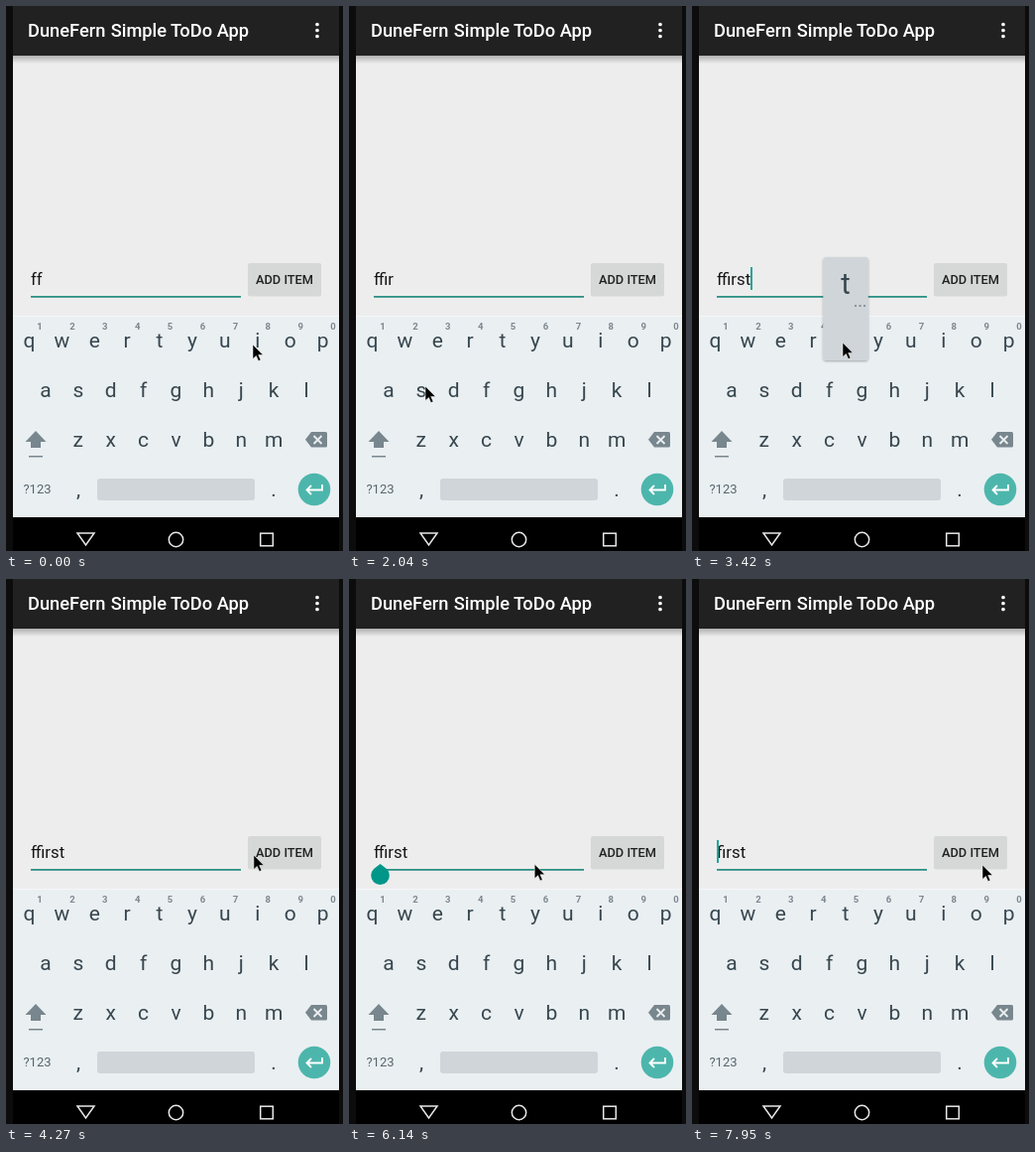
An HTML page that plays this animation: 340 px wide and 549 px high, repeating every 8 s.

```html
<!DOCTYPE html>
<html lang="en">
<head>
<meta charset="utf-8">
<style>
  html, body { margin: 0; width: 100%; height: 100%; overflow: hidden; background: #0c0c0c; }
  svg { display: block; width: 100%; height: 100%; font-family: Roboto, sans-serif; }
  .medium { font-weight: 500; }
  .key { font-size: 21px; fill: #37474f; text-anchor: middle; }
  .hint { font-size: 9.5px; font-weight: 700; fill: #7c878d; text-anchor: middle; }
  .nav { fill: none; stroke: #e8e8e8; stroke-width: 1.5; }
</style>
</head>
<body>
<svg viewBox="0 0 340 549">
  <defs>
    <linearGradient id="shade" x2="0" y2="1">
      <stop stop-color="#000" stop-opacity=".26"/>
      <stop offset="1" stop-color="#000" stop-opacity="0"/>
    </linearGradient>
    <filter id="shadow" x="-20%" y="-20%" width="140%" height="140%">
      <feDropShadow dx="0" dy="1" stdDeviation="1" flood-opacity=".3"/>
    </filter>
  </defs>

  <rect width="340" height="549" fill="#0c0c0c"/>
  <rect x="7" y="50" width="329" height="262" fill="#ededed"/>
  <rect x="7" y="50" width="329" height="8" fill="url(#shade)"/>
  <rect x="7" width="329" height="50" fill="#212121"/>
  <g class="medium" font-size="18.3" fill="#fff">
    <text x="22" y="31">DuneFern</text>
    <text x="245" y="31" text-anchor="end">Simple ToDo App</text>
  </g>
  <path d="M314 18.5V31" stroke="#fff" stroke-width="3.7" stroke-linecap="round" stroke-dasharray="0 6"/>

  <rect x="25" y="292" width="212" height="1.8" fill="#2f9186"/>
  <text id="entry" x="25" y="280.7" font-size="16.8" fill="#151515"></text>
  <rect id="caret" y="263" width="2" height="23" fill="#26a69a"/>
  <rect x="244" y="259" width="74" height="33.5" rx="2" fill="#d6d7d7"/>
  <text class="medium" x="281" y="280.3" font-size="12.8" fill="#212121" text-anchor="middle">ADD ITEM</text>

  <rect x="7" y="312" width="329" height="203" fill="#f5f7f8"/>
  <rect x="7" y="313" width="329" height="202" fill="#eaeff2"/>
  <g id="keys"></g>
  <g fill="#78868d">
    <path d="M30 428L40.5 439H35V445H25V439H19.5Z"/>
    <rect x="23" y="453" width="14" height="1.5"/>
    <path d="M308 429H322.5Q324 429 324 430.5V443Q324 444.5 322.5 444.5H308L302 436.8Z"/>
    <path d="M310.5 433L318.5 441M318.5 433L310.5 441" stroke="#eaeff2" stroke-width="1.8"/>
  </g>
  <text x="31.5" y="491" font-size="13" fill="#56656c" text-anchor="middle">?123</text>
  <rect x="92" y="476" width="159" height="22" rx="3" fill="#cfd5d8"/>
  <circle cx="311" cy="487" r="16.3" fill="#4db6ac"/>
  <path d="M319 482V487.5H304M308 483L303.5 487.5L308 492" fill="none" stroke="#fff" stroke-width="1.8"/>

  <rect x="7" y="515" width="329" height="34" fill="#000"/>
  <path class="nav" d="M72 531H89L80.5 543Z"/>
  <circle class="nav" cx="171.5" cy="537.5" r="7.2"/>
  <rect class="nav" x="256.7" y="531.2" width="12.6" height="12.6"/>

  <path id="handle" d="M31.5 287L38 292A9.3 9.3 0 1 1 25 292Z" fill="#009688"/>
  <g id="popup">
    <rect x="-22.7" y="-84" width="45.4" height="104" rx="3" fill="#cfd5d8" filter="url(#shadow)"/>
    <text id="popupLetter" y="-47" font-size="29" fill="#37474f" text-anchor="middle"></text>
    <path d="M9 -35H20" stroke="#87949a" stroke-width="2" stroke-dasharray="2 2.5"/>
  </g>
  <path id="pointer" d="M0 0V14.5L3.4 11.4L5.7 16.6L8 15.6L5.7 10.5H10.3Z" stroke="#fff" stroke-opacity=".75" stroke-width=".7"/>
</svg>
<script>
const $ = id => document.getElementById(id);
const LOOP = 8000, STEP = 132, BLINK = 500, PITCH = 32.9;

// Keyboard: rows are centred, 50px apart
const keyAt = {};
let keyMarkup = '';
const addKey = (letter, x, y) => {
  keyAt[letter] = [x, y];
  keyMarkup += `<text class="key" x="${x}" y="${y + 7}">${letter}</text>`;
};
['qwertyuiop', 'asdfghjkl', 'zxcvbnm'].forEach((row, r) => {
  [...row].forEach((letter, i) => addKey(letter, 171.5 + (i - (row.length - 1) / 2) * PITCH, 337 + 50 * r));
});
addKey(',', 73, 487);
addKey('.', 270, 487);
for (let i = 0; i < 10; i++)
  keyMarkup += `<text class="hint" x="${34 + i * PITCH}" y="326">${(i + 1) % 10}</text>`;
$('keys').innerHTML = keyMarkup;

// Each gesture starts at a pointer position, may edit the text, then glides on in a number of steps
const gestures = [
  { at: -BLINK, from: [249, 341], steps: 1, text: 'ff', caret: 2 },
  { at: 150, from: [249, 341], steps: 7, text: 'ffi', caret: 3, key: 'i' },
  { at: 1510, from: [120, 334], steps: 4, text: 'ffir', caret: 4, key: 'r' },
  { at: 2340, from: [77, 383], steps: 5, text: 'ffirs', caret: 5, key: 's' },
  { at: 3420, from: [152, 339], steps: 4, text: 'ffirst', caret: 6, key: 't' },
  { at: 4120, from: [259, 278], steps: 8 },
  { at: 5230, from: [48, 278], steps: 8, text: 'ffirst', caret: 1, handle: true },
  { at: 6280, from: [213, 289], steps: 4 },
  { at: 6810, from: [320, 487], steps: 1 },
  { at: 7530, from: [313, 441], steps: 3, text: 'first', caret: 0 },
  { at: LOOP, from: [293, 288] }
];

function pointerAt(t) {
  const i = gestures.findLastIndex(g => g.at <= t);
  const { at, from, steps } = gestures[i], to = gestures[i + 1].from;
  const u = Math.min(1, Math.floor((t - at) / STEP) / steps);
  const ease = u * u * (3 - 2 * u);
  return from.map((value, axis) => value + (to[axis] - value) * ease);
}

const show = (id, visible) => $(id).setAttribute('visibility', visible ? 'visible' : 'hidden');
const move = (id, [x, y]) => $(id).setAttribute('transform', `translate(${x} ${y})`);

const ruler = document.createElement('canvas').getContext('2d');
ruler.font = '16.8px Roboto, sans-serif';

function draw(t) {
  const edit = gestures.findLast(g => g.text && g.at <= t);
  const age = t - edit.at;
  $('entry').textContent = edit.text;
  const before = ruler.measureText(edit.text.slice(0, edit.caret)).width;
  $('caret').setAttribute('x', Math.round(24.7 + before));
  show('caret', age % (2 * BLINK) < BLINK);
  show('handle', edit.handle);

  const pressed = edit.key && age < STEP;
  show('popup', pressed);
  if (pressed) {
    $('popupLetter').textContent = edit.key;
    move('popup', keyAt[edit.key]);
  }
  move('pointer', pointerAt(t));
}

const start = performance.now();
function tick() {
  draw(Math.max(0, performance.now() - start) % LOOP);
  requestAnimationFrame(tick);
}
tick();
</script>
</body>
</html>
```
